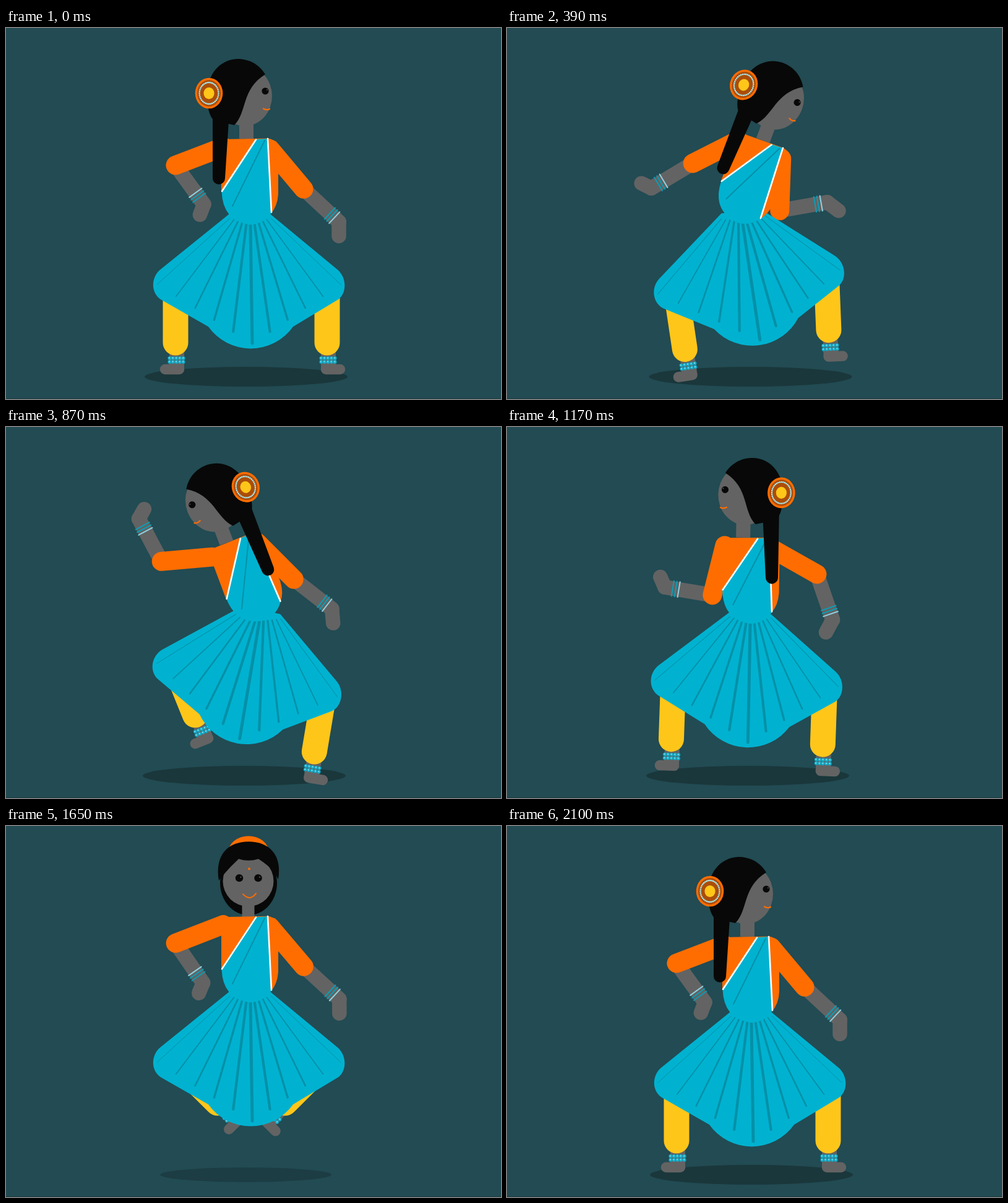
An HTML page with a canvas that plays this animation: 800 px wide and 600 px high, repeating every 2.13 s.

```html
<!DOCTYPE html>
<html lang="en">
<head>
<meta charset="utf-8">
<title>Dancer</title>
<style>
html, body { margin: 0; width: 100%; height: 100%; overflow: hidden; background: #224b53; }
canvas { display: block; }
</style>
</head>
<body>
<canvas id="stage" width="800" height="600"></canvas>
<script>
const c = document.getElementById('stage').getContext('2d');
const LOOP = 2130, RAD = Math.PI / 180;
const SKIN = '#636363', HAIR = '#080808', ORANGE = '#ff6d00', BLUE = '#00b2d0',
      FOLD = '#0590a8', YELLOW = '#ffc61a', PALE = '#8fd3e2', BROWN = '#ab4d0a';

const clamp = u => Math.max(0, Math.min(1, u));
const ease = u => u * u * (3 - 2 * u);

// Weight rising from 0 at a to 1 at peak and back to 0 at b
const ramp = (t, a, peak, b) => clamp(t < peak ? (t - a) / (peak - a) : (b - t) / (b - peak));
const pulse = (t, a, peak, b) => ease(ramp(t, a, peak, b));
const hop = (t, a, peak, b) => 1 - (1 - ramp(t, a, peak, b)) ** 2;

// The dance: a step to the right, one to the left, a backswing, then a jump
function poseAt(t) {
  const right = pulse(t, 0, 390, 870), left = pulse(t, 390, 870, 1170),
        back = pulse(t, 870, 1170, 1410), jump = hop(t, 1410, 1563, 1771),
        flare = pulse(t, 1640, 1800, 2095);
  const lean = right - left, tuck = 45 * clamp(jump * 1.25);
  const lift = -3.5 * (right + left) - 40 * jump;
  return {
    waist: [392 - 17.5 * lean - back, 300 + lift],
    tilt: 20.5 * lean + back,
    hip: [395 - 14 * lean - 2 * back, 320 + lift],
    sway: -7.5 * right + 10.4 * left + 2 * back,
    raise: 10 * left,
    legL: -8.5 * right - 22 * left + 2 * back - tuck,
    legR: -2.3 * right + 9.5 * left + 2 * back + tuck,
    upperL: 159 - 6 * right + 16 * left - 55 * back - 14 * flare,
    foreL: 54 + 95 * right + 188 * left + 135.5 * back + 96 * flare,
    upperR: 50 + 42 * right - 5 * left - 20.5 * back - 20 * flare,
    foreR: 43 - 53 * right - 5 * left + 28 * back - 28 * flare,
    shadow: 395 - 7 * (1 - ease(clamp(t / 390))) - 1.5 * right - 10 * left - 6 * back - 9 * jump,
    size: 1 - .19 * jump,
    face: t < 630 || t >= 1830 ? 'right' : t < 1290 ? 'left' : 'front'
  };
}

function at(x, y, deg, draw) {
  c.save();
  c.translate(x, y);
  c.rotate(deg * RAD);
  draw();
  c.restore();
}
function line(color, w, x1, y1, x2, y2, cap = 'round') {
  c.strokeStyle = color;
  c.lineWidth = w;
  c.lineCap = cap;
  c.beginPath();
  c.moveTo(x1, y1);
  c.lineTo(x2, y2);
  c.stroke();
}
function oval(color, x, y, rx, ry = rx) {
  c.fillStyle = color;
  c.beginPath();
  c.ellipse(x, y, rx, ry, 0, 0, 7);
  c.fill();
}
function shape(color, d) {
  c.fillStyle = color;
  c.fill(new Path2D(d));
}
function curve(color, w, d) {
  c.strokeStyle = color;
  c.lineWidth = w;
  c.lineCap = 'round';
  c.stroke(new Path2D(d));
}

// Point (x, y) of a part that is turned around its pivot
function joint(pivot, x, y, deg) {
  const s = Math.sin(deg * RAD), k = Math.cos(deg * RAD);
  return [pivot[0] + x * k - y * s, pivot[1] + x * s + y * k];
}

function leg(knee, deg, side, raise = 0) {
  at(...knee, deg, () => {
    c.translate(0, -raise);
    line(SKIN, 24, 2, 100, 2, 138, 'butt');
    line(SKIN, 16.5, 2 - side * 4, 139, 2 + side * 19, 139);
    line(YELLOW, 41, 0, 0, 0, 96);
    for (let i = 0; i < 10; i++) {
      const x = 1.5 + (i % 5 - 2) * 5.6, y = 121 + (i > 4 ? 6 : 0);
      oval('#12a9c6', x, y, 2.9);
      oval('#8fe0ee', x - .4, y - .4, 1.1);
    }
  });
}

function arm(shoulder, upper, fore, left) {
  const length = left ? 82.5 : 84;
  at(...joint(shoulder, length, 0, upper), fore, () => {
    line(SKIN, 24, 0, 0, 78, 0);
    at(78, 0, left ? 57 : 47, () => line(SKIN, 23.5, 0, 0, left ? 18 : 23, 0));
    for (let i = 0; i < 3; i++) {
      const x = left ? 55 + i * 5 : 68 - i * 5;
      line(i ? '#0c9db5' : PALE, 2, x, -12.5, x, 12.5);
    }
  });
  at(...shoulder, upper, () => line(ORANGE, 31, 0, 0, length, 0));
}

function skirt() {
  shape(BLUE, 'M363 299L249 391C234 404 234 428 250 439L327 483A84 84 0 0 0 464 483' +
    'L537 439C551 429 551 404 536 391L426 300Z');
  for (let i = -5; i <= 5; i++) {
    const n = Math.abs(i);
    line(FOLD, 5 - n * .8, 395 + i * 6.6, 319 - n * 2.3, 398 + i * (i < 0 ? 30.8 : 28.6), 510 - n * 19);
  }
}

function torso() {
  shape(ORANGE, 'M349 180L424 178.5Q440 182 440 200V268Q439 288 428 300L360 290L348 264V195Z');
  shape(BLUE, 'M404 180L423 179L429 299Q415 318 394 318Q350 312 348.5 264Z');
  line(FOLD, 2, 418, 182, 366, 288);
  line('#fff', 2.6, 404, 180.5, 349, 264);
  line('#fff', 2.6, 423, 179, 429, 298);
}

function flower(x, y) {
  oval(ORANGE, x, y, 22.3, 24.8);
  oval(BROWN, x, y, 19, 21.4);
  for (let i = 0; i < 36; i++) {
    const a = i * 10 * RAD;
    oval('#a5edf5', x + 15.4 * Math.cos(a), y + 17.4 * Math.sin(a), 1.3);
  }
  oval(YELLOW, x, y, 8.6, 9.6);
}

function sideHead(left) {
  c.save();
  if (left) {
    c.translate(769, 0);
    c.scale(-1, 1);
  }
  line(SKIN, 23, 388.5, 145, 388.5, 179, 'butt');
  oval(SKIN, 386, 110, 44, 48.5);
  shape(HAIR, 'M419 75C408 57 391 50 374 50C344 51 325 77 325 108C325 130 329 142 336 150' +
    'L369 157C390 136 380 99 419 75Z');
  at(left ? -3 : 0, 0, 0, () => shape(HAIR, 'M334 135V243A10 10 0 0 0 354 243L360 150V135Z'));
  oval(HAIR, 419, 102, 5.6);
  oval(SKIN, 422, 100, .9);
  curve(ORANGE, 2.3, 'M416 130.5Q421 133.5 426 131');
  flower(328, 105.5);
  c.restore();
}

function frontHead() {
  oval(ORANGE, 392, 76, 33, 27);
  oval(HAIR, 392, 125, 46, 52);
  line(SKIN, 20, 391.5, 155, 391.5, 180, 'butt');
  oval(SKIN, 391.5, 122, 41);
  shape(HAIR, 'M344 121C337 78 360 58 392 58C424 58 447 78 440 119L434 108' +
    'Q424 96 408 86Q392 91 376 86Q363 98 352 111Z');
  for (const x of [377, 407.5]) {
    oval(HAIR, x, 117, 6.2);
    oval('#777', x + 2.5, 115.5, .9);
  }
  oval(ORANGE, 393, 102, 2);
  curve(ORANGE, 2, 'M383 143Q394 155 404 142');
}

function draw(t) {
  const p = poseAt(t);
  c.fillStyle = '#224b53';
  c.fillRect(0, 0, 800, 600);
  c.fillStyle = '#1a3940';
  c.fillRect(0, 599, 800, 1);
  oval(p.size < .95 ? '#1c3d43' : '#1a373b', p.shadow, 564, 164 * p.size, 16 * p.size ** 1.8);

  leg(joint(p.hip, -121, 93, p.sway), p.legL, -1, p.raise);
  leg(joint(p.hip, 124, 93, p.sway), p.legR, 1);
  arm(joint(p.waist, -41, -107.5, p.tilt), p.upperL, p.foreL, true);
  arm(joint(p.waist, 35, -104, p.tilt), p.upperR, p.foreR, false);
  at(...p.hip, p.sway, () => {
    c.translate(-395, -320);
    skirt();
  });
  at(...p.waist, p.tilt, () => {
    c.translate(-392, -300);
    // The neck sits behind the neckline, the side plait in front of it
    if (p.face === 'front') frontHead();
    torso();
    if (p.face !== 'front') sideHead(p.face === 'left');
  });
}

const start = performance.now();
function tick() {
  draw((performance.now() - start) % LOOP);
  requestAnimationFrame(tick);
}
tick();
</script>
</body>
</html>
```
